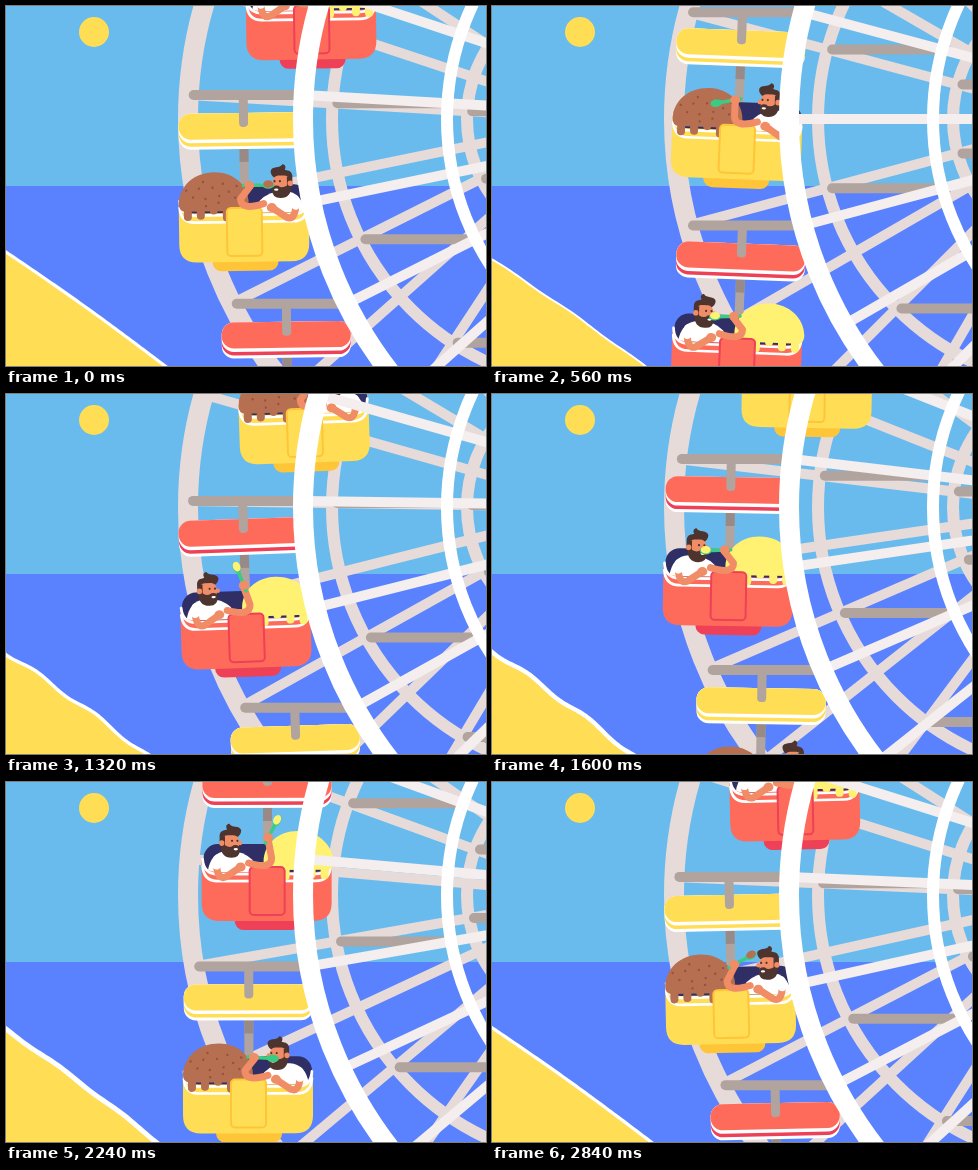
Animation of 480x360 px, one loop 2.88 s. Source, as an HTML page with a canvas:

```html
<!DOCTYPE html>
<html lang="en">
<head>
<meta charset="utf-8">
<title>Ferris wheel</title>
<style>
  html, body { margin: 0; width: 100%; height: 100%; overflow: hidden; }
  canvas { display: block; width: 480px; height: 360px; }
</style>
</head>
<body>
<canvas id="stage" width="480" height="360"></canvas>
<script>
const ctx = document.getElementById('stage').getContext('2d');
const TAU = Math.PI * 2, LOOP = 2880, STEP = 40, BITE = 960;
const HUB_Y = 113, BACK_X = 594, DEPTH = 115;
const RIM = 412;
const RINGS = [[RIM, 20], [268, 12], [133, 12]];

const C = {
  sky: '#69bbee', sea: '#5a82ff', sand: '#ffdd55', white: '#ffffff',
  backWheel: '#e6dbd9', spoke: '#f4eeef', bar: '#b1a49f', shade: '#988a86',
  navy: '#2f2f66', skin: '#f08c66', hair: '#4d342e', spoon: '#3ccb83'
};

// "digAt" is when the spoon is deepest in the ice cream; "flip" mirrors the rider.
const YELLOW = {
  main: '#ffdd55', dark: '#ffc538', band: '#ffdd55', ice: '#b66f50', spots: '#95523e',
  flip: -1, digAt: 560
};
const RED = {
  main: '#ff6b5b', dark: '#ee4056', band: '#ee4056', ice: '#fff172', spots: null,
  flip: 1, digAt: 40
};

function fill(color, path) {
  ctx.fillStyle = color;
  ctx.fill(new Path2D(path));
}
function stroke(color, width, path) {
  ctx.strokeStyle = color;
  ctx.lineWidth = width;
  ctx.stroke(new Path2D(path));
}
function box(color, x, y, w, h, r) {
  ctx.fillStyle = color;
  ctx.beginPath();
  ctx.roundRect(x, y, w, h, r);
  ctx.fill();
}
function oval(color, x, y, rx, ry = rx, angle = 0) {
  ctx.fillStyle = color;
  ctx.beginPath();
  ctx.ellipse(x, y, rx, ry, angle, 0, TAU);
  ctx.fill();
}
function mirrored(flip, draw) {
  ctx.save();
  ctx.scale(flip, 1);
  draw();
  ctx.restore();
}
function rimPoint(radius, degrees) {
  const a = degrees * Math.PI / 180;
  return [BACK_X - radius * Math.cos(a), HUB_Y + radius * Math.sin(a)];
}
function wave(t, peak, period = LOOP) {
  return Math.cos(TAU * (t - peak) / period);
}
function ease(from, to, t) {
  const u = Math.min(1, Math.max(0, (t - from) / (to - from)));
  return u * u * (3 - 2 * u);
}

function drawScenery(t) {
  box(C.sky, 0, 0, 480, 180, 0);
  box(C.sea, 0, 180, 480, 180, 0);
  oval(C.sand, 88, 26, 15);

  const top = 252 - 7 * wave(t, -250), foot = 150.5 + 10 * wave(t, 0);
  const ripple = 2.2 * Math.sin(TAU / 2 * t / LOOP) ** 2;
  let shore = `M-10 ${top - 7}`;
  for (let s = 0; s <= 1.1; s += 0.02) {
    const dy = -2 * Math.sin(Math.PI * s) - ripple * Math.sin(s * 15 - TAU * t / LOOP + 1.2);
    shore += `L${foot * s} ${top + (361 - top) * s + dy}`;
  }
  fill(C.sand, shore + 'V380H-10Z');
  stroke(C.white, 3.5 + 1.6 * wave(t, 2050), shore);
}

function drawWheel(cx, rings, ringColor, spokeColor, angle) {
  for (let d = -90; d <= 90; d += 15) {
    const [x, y] = rimPoint(RIM, angle + d);
    stroke(spokeColor, 10, `M${x + cx - BACK_X} ${y}L${cx} ${HUB_Y}`);
  }
  ctx.strokeStyle = ringColor;
  for (const [radius, width] of rings) {
    ctx.lineWidth = width;
    ctx.beginPath();
    ctx.arc(cx, HUB_Y, radius, 0, TAU);
    ctx.stroke();
  }
}

function drawBars(angle) {
  for (const [radius] of RINGS)
    for (let d = -60; d <= 90; d += 30) {
      const [x, y] = rimPoint(radius, angle + d);
      box(C.bar, x, y - 5, DEPTH, 10, 5);
    }
}

function drawHead(x, y) {
  ctx.save();
  ctx.translate(x, y);
  ctx.scale(1.08, 1.13);
  fill(C.hair, 'M-10 2V-7C-9 -12 -5 -11 -3 -12C-5 -15 -3 -17 -1 -17C1 -13 9 -16 10 -11C10 -8 8 -6 6 -5Z');
  box(C.skin, -8, -7, 16, 15, 5);
  fill(C.hair, 'M-9 -6H-5V2Q0 5 3 2Q8 1 9 5Q9 13 1 13Q-9 13 -9 2Z');
  oval(C.skin, -8, 0, 2.5);
  oval(C.skin, 9, 0, 2);
  oval(C.hair, 1.5, -2, 1);
  oval(C.hair, 6.5, -2, 1);
  oval(C.white, 5, 5.5, 2, 1);
  ctx.restore();
}

function drawIceCream(style) {
  fill(style.ice, 'M-4 108C-4 90 11 77 30 77C50 77 65 90 66 108Q66 116 59 116H2Q-4 116 -4 108Z');
  for (let i = 0; i < 5; i++) {
    const x = 5 + 13 * i;
    stroke(style.ice, 8, `M${x} 110V${119 + 4 * Math.sin(i * 2.2)}`);
  }
  if (!style.spots) return;
  for (let i = 1; i < 14; i++) {
    const r = Math.sqrt(i / 14), a = i * 2.4;
    oval(style.spots, 31 + 29 * r * Math.cos(a), 98 + 15 * r * Math.sin(a), 1.2);
  }
}

function drawSpoonArm(style, phase) {
  const lift = ease(180, 420, phase) - ease(740, BITE, phase);
  const hx = 4 - 9 * lift, hy = 88 + 3 * lift - 6 * Math.sin(Math.PI * lift);
  const dir = 0.2 - 3.4 * lift, cos = Math.cos(dir), sin = Math.sin(dir);
  const tx = hx + 19 * cos, ty = hy + 19 * sin;
  stroke(C.skin, 7, `M-19 109Q4 116 4 104L${hx} ${hy + 2}`);
  stroke(C.spoon, 3.5, `M${hx - 6 * cos} ${hy - 6 * sin}L${tx} ${ty}`);
  oval(C.spoon, tx, ty, 6, 3.8, dir);
  if (phase > 100 && phase < 700) oval(style.ice, tx, ty - 1, 5, 3.7, dir);
  oval(C.skin, hx, hy, 5, 4.5);
}

function drawCanopy(style) {
  const layers = [[C.white, 36], [style.band, 33], [C.white, 29.5], [style.main, 26]];
  for (const [color, height] of layers) box(color, -65, 18, 129, height, 12);
}

function drawGondola(style, x, y, tilt, t) {
  const phase = (t - style.digAt + BITE) % BITE;
  ctx.save();
  ctx.translate(x, y);
  ctx.rotate(tilt);

  box(C.bar, -4.5, 45, 9, 65, 0);
  box(C.shade, -4.5, 45, 9, 22, 0);
  drawCanopy(style);
  box(C.bar, -4.5, 0, 9, 32, [0, 0, 4, 4]);

  box(style.dark, -33, 155, 66, 21, 9);
  box(C.navy, -64, 90, 127, 43, 14);

  mirrored(style.flip, () => {
    fill(C.white, 'M-60 118Q-57 98 -41 97Q-25 96 -15 106V118Z');
    drawHead(-33 + 4.5 * wave(phase, 820, BITE), 89);
  });

  fill(style.main, 'M-66 104Q-65 118 -50 118H48Q63 118 64 104V149Q64 167 46 167H-48Q-66 167 -66 149Z');
  for (const dy of [0, 7])
    stroke(C.white, 2.7, `M-65 ${105 + dy}Q-64 ${120 + dy} -50 ${120 + dy}H48Q62 ${120 + dy} 63 ${105 + dy}`);

  mirrored(style.flip, () => drawIceCream(style));

  box(style.main, -18, 113, 35, 48, 4);
  ctx.strokeStyle = style.dark;
  ctx.lineWidth = 2;
  ctx.stroke();

  mirrored(style.flip, () => {
    drawSpoonArm(style, phase);
    stroke(C.skin, 7, 'M-51 112Q-50 126 -42 123L-27 113');
    oval(C.skin, -27, 113, 5, 4.5);
    stroke(C.white, 9, 'M-50 105L-51 111');
  });
  ctx.restore();
}

function render(now) {
  const t = Math.floor(now % LOOP / STEP) * STEP;
  const angle = -3.35 - 60 * t / LOOP;
  const tilt = 2.6 * Math.PI / 180 * wave(t, 430, LOOP / 2);
  ctx.lineCap = ctx.lineJoin = 'round';

  drawScenery(t);
  drawWheel(BACK_X, RINGS, C.backWheel, C.backWheel, angle + 60);
  drawBars(angle + 60);
  for (let k = -2; k <= 4; k++) {
    const [x, y] = rimPoint(RIM, angle + 30 * k);
    drawGondola(k % 2 ? RED : YELLOW, x + 54.5, y, tilt, t);
  }
  drawWheel(BACK_X + DEPTH, RINGS.slice(0, 2), C.white, C.spoke, angle + 30);
}

const start = performance.now();
requestAnimationFrame(function tick() {
  render(performance.now() - start);
  requestAnimationFrame(tick);
});
</script>
</body>
</html>
```
